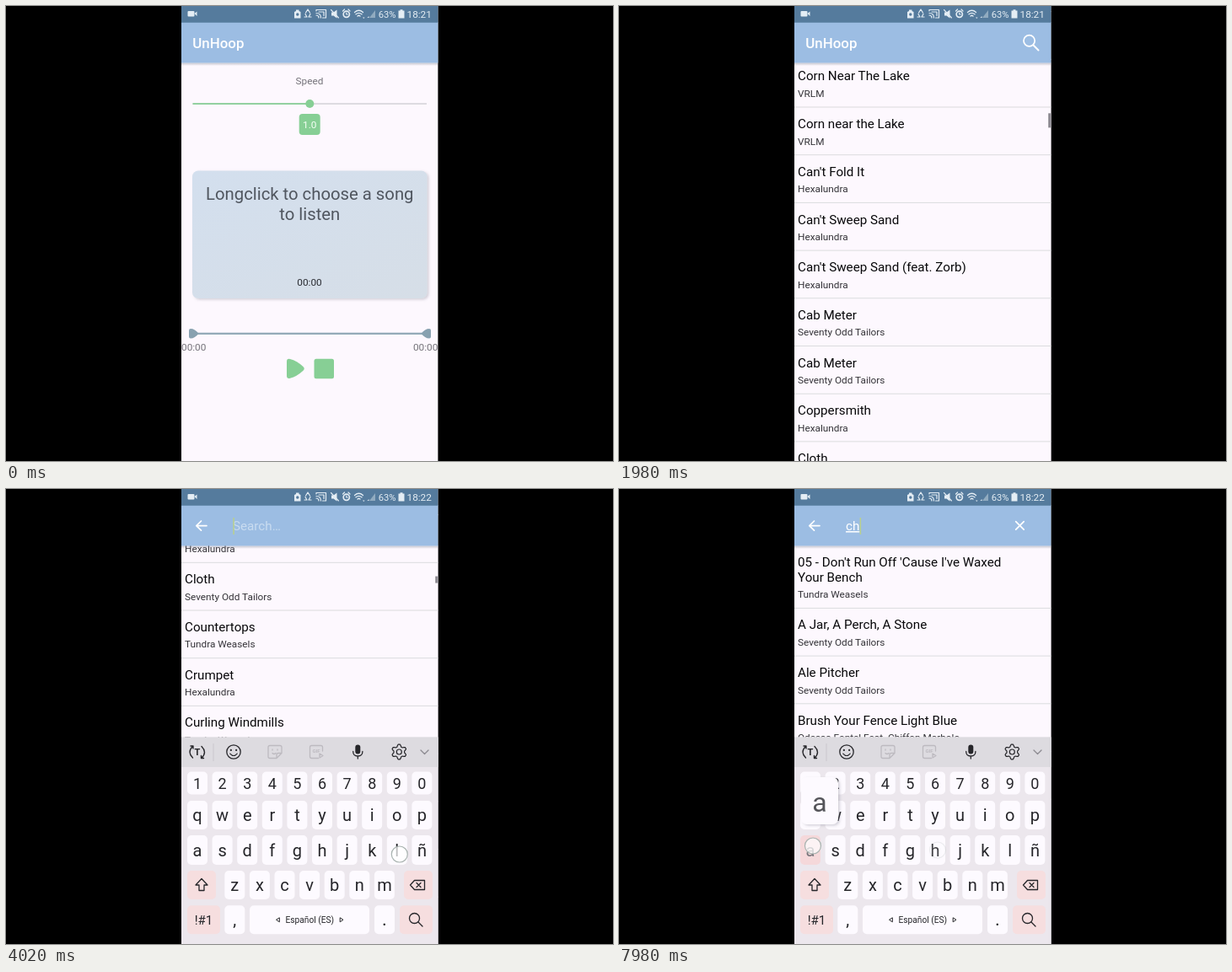
An HTML page for the animation above (8 s loop, 720x540 px).

```html
<!DOCTYPE html>
<html lang="en">
<head>
<meta charset="utf-8">
<title>Music picker</title>
<style>
html, body { margin: 0; width: 100%; height: 100%; overflow: hidden; background: #000; }
svg { display: block; width: 720px; height: 540px; font-family: Roboto, sans-serif; }
text { white-space: pre; }
</style>
</head>
<body>
<svg id="stage" viewBox="0 0 720 540">
  <defs>
    <clipPath id="screen"><rect x="208" width="304.4" height="540"/></clipPath>
    <linearGradient id="shade" x2="0" y2="1">
      <stop stop-color="#6d7480" stop-opacity=".38"/><stop offset="1" stop-color="#6d7480" stop-opacity="0"/>
    </linearGradient>
    <linearGradient id="card" y2="1"><stop stop-color="#d3dfee"/><stop offset="1" stop-color="#d6dee7"/></linearGradient>
    <filter id="soft" x="-10%" y="-10%" width="120%" height="130%"><feDropShadow dy="1.5" stdDeviation="1.6" flood-color="#667" flood-opacity=".28"/></filter>
  </defs>
  <g id="phone" clip-path="url(#screen)"></g>
</svg>
<script>
const LOOP = 8000, STEP = 30, TOP = 67.2, ROW = 56.7, LINE = 17.5, CONTENT = 13100;
const GREEN = '#87cf95', PAPER = '#fdf8fe', KEY = '#fdfaff', PINK = '#f6dedf', INK = '#26262a';

const artists = ['Seventy Odd Tailors', 'Tundra Weasels', 'VRLM', 'Odessa Fontel', 'Some Tansy',
  'Hexalundra', 'Chavel Tonn', 'Odessa Fontel Feat. Chiffon Marbolo'];
const songs = `05 - Don't Run Off 'Cause I've Waxed/Your Bench|1
A Jar, A Perch, A Stone|0
Acorn Street|5
Afternoon Pails|1
Agate|4
Ahead Of Noon|3
Ale Pitcher|0
Few Of My Stools|1
Kettle|2
Gravel Is Rarely Purple [ft. Marlen Quiskow]|3
Ledge|4
Suburban Cups|4
Sideboard|0
Tamarind|1
Jelly U|3
Badge Of Felt|3
Balcony|1
Barley Road|5
Basket|2
Beadwork|0
Bellows|1
Birdbath|5
Brush Your Fence Light Blue|7
Bristle|3
Broom|4
Bucket Song|1
Button|2
Cabin Nine|5
Candle Shop|0
Corn Near The Lake|2
Corn near the Lake|2
Can't Fold It|5
Can't Sweep Sand|5
Can't Sweep Sand (feat. Zorb)|5
Cab Meter|0
Cab Meter|0
Coppersmith|5
Cloth|0
Countertops|1
Crumpet|5
Curling Windmills|1
D Is not Decorative|1
VRLM|2
Dust Lamp|5
Ember Lane|1
Loft Lime Ivy|6`.split('\n').map(s => {
  const [title, id] = s.split('|');
  return { lines: title.split('/'), artist: artists[id] };
});

const $ = (tag, attrs, parent, text) => {
  const node = document.createElementNS('http://www.w3.org/2000/svg', tag);
  set(node, attrs);
  if (text !== undefined) node.textContent = text;
  parent.append(node);
  return node;
};
const set = (node, attrs) => { for (const k in attrs) node.setAttribute(k, attrs[k]); };
const group = (parent, attrs = {}) => $('g', attrs, parent);
const rect = (p, x, y, width, height, fill, rx = 0) => $('rect', { x, y, width, height, fill, rx }, p);
const band = (p, y, height, fill) => rect(p, 208, y, 305, height, fill);
const circle = (p, cx, cy, r, attrs) => $('circle', { cx, cy, r, ...attrs }, p);
const fillPath = (p, d, fill) => $('path', { d, fill }, p);
const stroke = (p, d, color, width = 1.3) => $('path', {
  d, fill: 'none', stroke: color, 'stroke-width': width, 'stroke-linecap': 'round', 'stroke-linejoin': 'round' }, p);
const label = (p, s, x, y, size, fill, anchor = 'start', weight = 400) => $('text', {
  x, y, fill, 'font-size': size, 'text-anchor': anchor, 'font-weight': weight }, p, s);
const clamp = (v, lo = 0, hi = 1) => Math.min(hi, Math.max(lo, v));
const easeOut = v => 1 - (1 - clamp(v)) ** 3;

const phone = document.getElementById('phone');
band(phone, 0, 540, PAPER);

// Player screen
const player = group(phone);
label(player, 'Speed', 360, 92.5, 11.8, '#75737a', 'middle');
rect(player, 221.5, 115.2, 277.5, 1.7, '#d9d6dc');
rect(player, 221.5, 115.2, 139, 1.7, GREEN);
circle(player, 360.3, 116, 5, { fill: GREEN });
rect(player, 347.7, 128, 25, 25, GREEN, 4);
label(player, '1.0', 360.2, 145, 11.8, '#f6fff6', 'middle');
rect(player, 221, 195.5, 278.5, 151.5, 'url(#card)', 7).setAttribute('filter', 'url(#soft)');
label(player, 'Longclick to choose a song', 360.3, 230, 20.3, '#50565f', 'middle');
label(player, 'to listen', 360.3, 253.8, 20.3, '#50565f', 'middle');
label(player, '00:00', 360, 331.5, 11.8, '#2b2d33', 'middle');
rect(player, 222, 387.7, 277, 2.2, '#8fa7b5');
fillPath(player, 'M217 385q0-2 2-2q5 0 9.500 5.800q-4.500 5.800-9.500 5.800q-2 0-2-2zM504 385q0-2-2-2q-5 0-9.500 5.800q4.500 5.800 9.500 5.800q2 0 2-2z', '#88a1b0');
label(player, '00:00', 208, 409.3, 11.8, '#75737a');
label(player, '00:00', 512.3, 409.3, 11.8, '#75737a', 'end');
fillPath(player, 'M333 422q0-4 4-3q8 2 15.500 9q2.500 2.400 0 4.800q-7.500 7-15.500 9q-4 1-4-3z', GREEN);
rect(player, 365.5, 418.7, 23.5, 23.5, GREEN, 2.5);

// Song list
const listScreen = group(phone);
band(listScreen, TOP, 520, PAPER);
const list = group(listScreen);
const thumb = rect(listScreen, 509.2, 0, 3, 17, '#8d8a92');
let shownQuery = null;
function fillList(query) {
  if (query === shownQuery) return;
  shownQuery = query;
  list.replaceChildren();
  let y = 0;
  for (const { lines, artist } of songs) {
    if (!(lines.join(' ') + '|' + artist).toLowerCase().includes(query)) continue;
    lines.forEach((s, i) => label(list, s, 212, y + 25.1 + i * LINE, 15.2, '#08080a'));
    const extra = (lines.length - 1) * LINE;
    label(list, artist, 212, y + 44.5 + extra, 11.8, '#343338');
    y += ROW + extra;
    if (query !== phrase) band(list, y - .5, 1, '#dbdcde');
  }
}

// App bar and status bar
band(phone, 67.5, 3.5, 'url(#shade)');
band(phone, 19, 48.5, '#9cbde3');
band(phone, 0, 19.7, '#557b9d');
const status = group(phone);
const PALE = '#e4edf4';
rect(status, 215.5, 6, 8, 6.5, PALE, 1);
fillPath(status, 'M223.500 9l3-2.500v5.500z', PALE);
fillPath(status, 'M342 7l2-1v-1.500h3.500v1.500l2 1v7.500h-7.500z', PALE);
circle(status, 345.8, 10, 1.7, { fill: '#557b9d' });
stroke(status, 'M355.500 8l2.500-4l2.500 4M354 13h3l-2-3.500M362 13h-3l2-3.500', PALE, 1.2);
stroke(status, 'M368 6v-1.500h11.500v9.500h-4M368 8.500q5.500 0 5.500 5.500M368 11q3 0 3 3M371 7h6v4.500', PALE, 1.2);
fillPath(status, 'M386 7.500h2.500l4-3v10l-4-3h-2.500z', PALE);
stroke(status, 'M385.500 4.500l9 9.500', PALE, 1.1);
circle(status, 403.8, 9.8, 3.6, { fill: 'none', stroke: PALE, 'stroke-width': 1.7 });
stroke(status, 'M403.800 8v2h1.500M399.500 6l2-2M408 6l-2-2', PALE, 1.2);
stroke(status, 'M413.500 7.500q5-4.500 10 0M415 9.800q3.500-3 7 0M417 12q1.500-1.500 3 0', PALE, 1.3);
fillPath(status, 'M423 13.500l2.500 0l-1.200 1.500zM428.500 14h2v-2z', PALE);
fillPath(status, 'M431 14h7v-9z', '#91abc0');
label(status, '63%', 441.7, 13.8, 11.2, PALE);
fillPath(status, 'M465.500 5.500h2v-1.300h3v1.300h2v9h-7z', PALE);
const clock = label(status, '', 475.5, 13.8, 11.8, PALE);

const titleBar = group(phone);
label(titleBar, 'UnHoop', 221.3, 50, 16.9, '#fff', 'start', 500);
const magnifier = group(titleBar);
stroke(magnifier, 'M491.500 46.500l6 6', '#fff', 2);
circle(magnifier, 486.6, 41.2, 6.6, { fill: 'none', stroke: '#fff', 'stroke-width': 1.7 });

const searchBar = group(phone);
stroke(searchBar, 'M238 43.600h-12M231.500 38l-5.700 5.600l5.700 5.600', '#fff', 1.7);
const hint = label(searchBar, 'Search…', 269, 49, 15.2, '#c9dcf0');
const field = label(searchBar, '', 269, 49, 15.2, '#fff');
const doneWords = $('tspan', {}, field), openWord = $('tspan', { 'text-decoration': 'underline' }, field);
const cursor = rect(searchBar, 269, 34, 1.5, 20, '#b9d08d');
const cross = stroke(searchBar, 'M470.700 38.700l9.500 9.500M480.200 38.700l-9.500 9.500', '#fff', 1.7);

// Keyboard
const board = group(phone);
band(board, 294.5, 246, '#ece7ed');
band(board, 294.5, 35.5, '#dddbe0');
rect(board, 245.5, 302, 1, 21, '#cbc8ce');
stroke(board, 'M221.500 319q-7-7 0-13.500M219 305h3v3M232 305.500q7 7 0 13.500M234.500 319.500h-3v-3', INK, 1.4);
stroke(board, 'M492 310l4.500 4.500l4.500-4.500', '#8c8a90', 1.3);
const tools = group(board), words = group(board);
label(tools, 'T', 226.8, 316.3, 11, INK, 'middle', 700);
const face = (p, x, y, r) => {
  circle(p, x - r * .38, y - r * .25, 1.1, { fill: INK });
  circle(p, x + r * .38, y - r * .25, 1.1, { fill: INK });
  stroke(p, `M${x - r * .5} ${y + r * .25}q${r * .5} ${r * .6} ${r} 0`, INK, 1.2);
};
circle(tools, 270, 312, 8.2, { fill: 'none', stroke: INK, 'stroke-width': 1.3 });
face(tools, 270, 312, 8.2);
face(words, 226.8, 312.5, 5.5);
const FAINT = '#bdbac0';
stroke(tools, 'M313 304.500h12q2 0 2 2v7l-6 6h-8q-2 0-2-2v-11q0-2 2-2M327 313.500h-4q-2 0-2 2v4M316 309v1M322 309v1M316 313.500q2 2 4 0', FAINT);
stroke(tools, 'M375.500 311v-4.500q0-2-2-2h-11q-2 0-2 2v11q0 2 2 2h8M372 314l4 2.500l-4 2.500z', FAINT);
label(tools, 'GIF', 368, 313, 6, FAINT, 'middle', 700);
rect(tools, 414.3, 303.5, 6, 11, INK, 3);
stroke(tools, 'M411.700 311.500q0 5.500 5.600 5.500q5.600 0 5.600-5.500M417.300 317v3', INK);
const teeth = Array.from({ length: 48 }, (_, i) => {
  const a = i * Math.PI / 24, r = 7.6 + 1.3 * Math.tanh(3 * Math.cos(6 * a));
  return `${466.3 + r * Math.sin(a)} ${312 - r * Math.cos(a)}`;
});
stroke(tools, `M${teeth.join('L')}Z`, INK, 1.2);
circle(tools, 466.3, 312, 3, { fill: 'none', stroke: INK, 'stroke-width': 1.2 });
const hints = [286, 367.5, 448.5].map(x => label(words, '', x, 318, 14.5, '#3b3a3f', 'middle'));

const keys = {};
function addKey(name, x, y, w, h, fill = KEY, size = 20, drop = 7) {
  const box = rect(board, x - w / 2, y - h / 2, w, h, fill, 5);
  const glyph = label(board, name, x, y + drop, size, INK, 'middle');
  keys[name] = { x, y, box, glyph };
}
[['1234567890', 349, 27, 227, 18, 6.5], ['qwertyuiop', 387, 34, 227, 20, 7],
 ['asdfghjklñ', 428.5, 35, 227, 20, 7], ['zxcvbnm', 470, 34, 271.3, 20, 7]]
  .forEach(([chars, y, h, x0, size, drop]) =>
    [...chars].forEach((c, i) => addKey(c, x0 + i * 29.6, y, 24, h, KEY, size, drop)));
addKey('!#1', 234.5, 511.3, 39, 34, PINK, 15, 5.5);
addKey(',', 271.3, 511.3, 24, 34);
addKey(' ', 360, 511.3, 142, 34);
addKey('.', 449, 511.3, 24, 34, KEY, 22);
label(board, 'Español (ES)', 360.3, 515, 10.2, INK, 'middle');
stroke(board, 'M324 509l-3.500 2.300l3.500 2.300zM396.500 509l3.500 2.300l-3.500 2.300z', INK, 1);
rect(board, 215, 453, 34, 34, PINK, 5);
rect(board, 472, 453, 34, 34, PINK, 5);
rect(board, 467, 494.3, 39, 34, PINK, 5);
stroke(board, 'M232 462.500l7 7.500h-4v6.500h-6v-6.500h-4z', INK);
stroke(board, 'M479.500 470l5-5.500h12v11h-12zM487 467.500l5 5M492 467.500l-5 5', INK);
circle(board, 484.5, 509.5, 6, { fill: 'none', stroke: INK, 'stroke-width': 1.3 });
stroke(board, 'M489 514l5 5', INK);

const popup = group(phone, { filter: 'url(#soft)' });
rect(popup, -22, -28, 44, 56, KEY, 7);
const popupGlyph = label(popup, '', 0, 13, 32, '#55545a', 'middle');

// Timeline: key presses, resulting text and touch points
const presses = [[7330, 'c', 0], [7780, 'h', 0], [7930, 'a', -5]];
const phrase = 'loft lime';
[...phrase].forEach((c, i) => presses.push([4000 + i * 186, c, i ? 0 : 5]));
const edits = [[3700, '']];
[...phrase].forEach((_, i) => edits.push([4070 + i * 186, phrase.slice(0, i + 1)]));
for (let n = 8; n >= 0; n--) edits.push([n === 8 ? 6310 : 6640 + (7 - n) * 45, phrase.slice(0, n)]);
edits.push([7400, 'c'], [7850, 'ch']);

const touches = [[60, 260, 360, 270, 0], [690, 860, 385, 455, -200], [3220, 3310, 488, 43, 0], [6270, 6970, 489, 470, 0],
  ...presses.map(([at, c, dy]) => [at, at + 80, keys[c].x + 3, keys[c].y + dy, 0])];
const dots = touches.map(() => circle(phone, 0, 0, 9.5, { fill: '#fff', 'fill-opacity': .7, stroke: '#a9b3b0', 'stroke-width': 1.2 }));

// time, offset, speed
const path = [[690, 0, .5], [1020, 380.3, 1.5], [1980, 1665.7, .85], [2670, 2014.2, .27], [3100, 2095.3, 0]];
function scrollAt(t) {
  if (t <= path[0][0]) return 0;
  const i = path.findIndex(p => p[0] > t);
  if (i < 0) return path[path.length - 1][1];
  const [t0, a, va] = path[i - 1], [t1, b, vb] = path[i];
  const d = t1 - t0, u = (t - t0) / d, v = 1 - u;
  return v * v * (1 + 2 * u) * a + u * u * (3 - 2 * u) * b + d * u * v * (v * va - u * vb);
}

function draw(t) {
  const enter = easeOut((t - 280) / 250), opened = clamp((t - 3320) / 120), rise = easeOut((t - 3420) / 260);
  const [editedAt, query] = edits.filter(e => e[0] <= t).pop() || edits[0];
  const offset = t < edits[1][0] ? scrollAt(t) : 0;

  fillList(query);
  set(listScreen, { opacity: enter, transform: `translate(0 ${40 * (1 - enter)})` });
  set(list, { transform: `translate(0 ${TOP - offset})` });
  const view = 472.8 - 245.3 * rise;
  set(thumb, { y: TOP + offset / CONTENT * view, height: Math.max(8, view * view / CONTENT),
    opacity: t < 690 ? 0 : clamp((4070 - t) / 40) });

  clock.textContent = t < 3000 ? '18:21' : '18:22';
  set(titleBar, { opacity: 1 - opened });
  set(magnifier, { opacity: enter });
  set(searchBar, { opacity: opened });
  const cut = query.lastIndexOf(' ') + 1;
  doneWords.textContent = query.slice(0, cut);
  openWord.textContent = query.slice(cut);
  set(hint, { opacity: query ? 0 : 1 });
  set(cross, { opacity: query ? 1 : 0 });
  set(cursor, { x: 269.3 + (query ? field.getComputedTextLength() : 0),
    opacity: Math.max(0, t - editedAt) % 1000 < 500 ? 1 : 0 });

  set(board, { transform: `translate(0 ${246 * (1 - rise)})`, opacity: rise ? 1 : 0 });
  const suggesting = query.length > 2;
  set(tools, { opacity: suggesting ? 0 : 1 });
  set(words, { opacity: suggesting ? 1 : 0 });
  (query.length < 6 ? ['loft', 'Lift', 'left'] : ['live', 'Line', 'pone'])
    .forEach((s, i) => { hints[i].textContent = s; });

  const held = presses.find(([at, c]) => c !== ' ' && t >= at + 30 && t < at + 130);
  for (const [, c] of presses) {
    const on = held && held[1] === c;
    set(keys[c].box, { fill: on ? '#f5d8da' : KEY });
    set(keys[c].glyph, { fill: on ? '#77757b' : INK });
  }
  set(popup, { opacity: held ? 1 : 0 });
  if (held) {
    const { x, y } = keys[held[1]];
    set(popup, { transform: `translate(${clamp(x, 238, 482)} ${y - 58.5})` });
    popupGlyph.textContent = held[1];
  }
  touches.forEach(([from, to, x, y, dy], i) => set(dots[i], {
    cx: x, cy: y + dy * clamp((t - from) / (to - from)),
    opacity: t <= from ? 0 : 1 - clamp((t - to) / 150) }));
}

// The picture advances in whole steps, like a screen recording.
const start = performance.now();
function tick() {
  const t = (performance.now() - start) % LOOP;
  draw(Math.floor(t / STEP) * STEP);
  requestAnimationFrame(tick);
}
tick();
</script>
</body>
</html>
```
